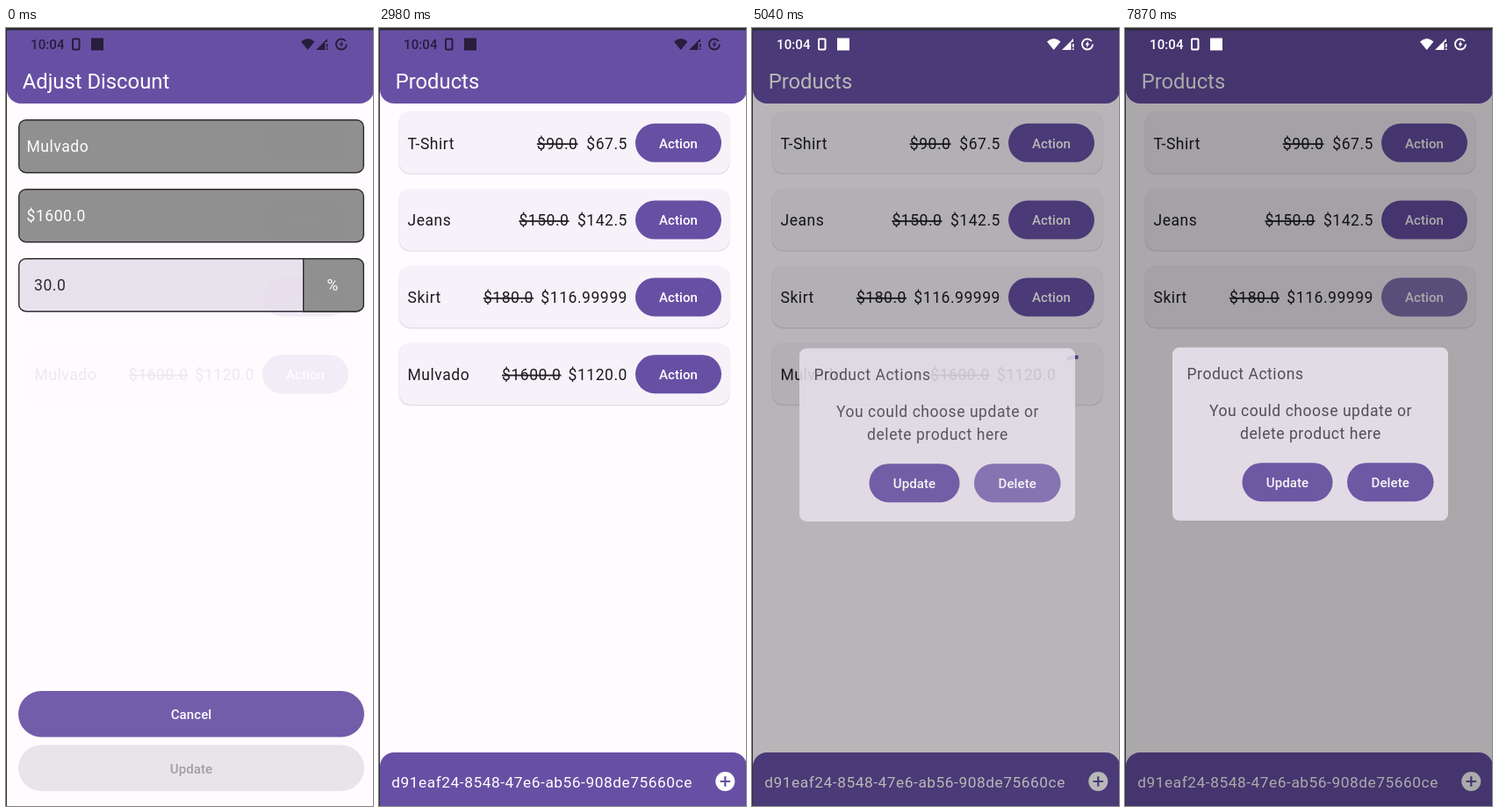
An HTML page for the animation above (8 s loop, 418 by 886 pixels).

```html
<!DOCTYPE html>
<html lang="en">
<head>
<meta charset="utf-8">
<style>
  html, body { margin: 0; width: 100%; height: 100%; overflow: hidden; background: #fffbfe; }
  svg { display: block; width: 100vw; height: 100vh; font: 17.5px Roboto, sans-serif; letter-spacing: .55px; }
  .label { font-size: 15px; font-weight: 500; letter-spacing: .1px; text-anchor: middle; }
  .title { font-size: 23.8px; letter-spacing: 0; }
  .end { text-anchor: end; }
  .mid { text-anchor: middle; }
  .old { text-decoration: line-through; }
  .spin { fill: none; stroke: #6750a4; stroke-width: 4.4; }
</style>
</head>
<body>
<svg id="stage" viewBox="0 0 418 886"></svg>
<script>
const LOOP = 8000, STEP = 148.25;
const PURPLE = '#6750a4', INK = '#1c1b1f', ITEM = 'Mulvado';

const rect = (x, y, w, h, r, fill, more = '') =>
  `<rect x="${x}" y="${y}" width="${w}" height="${h}" rx="${r}" fill="${fill}" ${more}/>`;
const text = (x, y, str, fill = INK, cls = '') =>
  `<text x="${x}" y="${y}" fill="${fill}" class="${cls}">${str}</text>`;
const button = (x, y, w, h, str, id) =>
  rect(x, y, w, h, h / 2, PURPLE) +
  (id ? rect(x, y, w, h, h / 2, '#fff', `id="${id}" opacity="0"`) : '') +
  text(x + w / 2, y + h / 2 + 5.8, str, '#fff', 'label');
const spinner = id => `<circle id="${id}" class="spin" r="19.8" pathLength="360"/>`;

function row(i, name, old, oldEnd, price) {
  const y = 95 + i * 87.8;
  return `<g id="row${i}">` +
    rect(22.5, y + .3, 377, 71.5, 13, '#e3dee6') + rect(23, y, 376, 70.5, 13, '#f7f2fa') +
    text(32.5, y + 42.5, name) +
    `<g id="price${i}">` + text(oldEnd, y + 42.5, old, INK, 'end old') +
    text(283, y + 42.5, price, INK, 'end') + '</g>' +
    `<g id="action${i}">` + button(292, y + 13.8, 98, 44, 'Action', 'ripple' + i) + '</g></g>';
}

function field(y, fill, str, x, color) {
  return rect(14.7, y, 392.6, 60, 8, fill, `stroke="${INK}" stroke-width="1.4"`) +
    text(x, y + 36.5, str, color);
}

const list = row(0, 'T-Shirt', '$90.0', 226.5, '$67.5') +
  row(1, 'Jeans', '$150.0', 216.5, '$142.5') +
  row(2, 'Skirt', '$180.0', 176, '$116.99999') +
  row(3, ITEM, '$1600.0', 207.5, '$1120.0') + spinner('rowSpin');

const form = field(104.7, '#888', ITEM, 23.5, '#fff') +
  field(183.7, '#888', '$1600.0', 23.5, '#fff') +
  field(262.7, '#e7e0ec', '30.0', 32, INK) +
  `<path d="M338.7 262.7H399.3a8 8 0 0 1 8 8V314.7a8 8 0 0 1-8 8H338.7z" fill="#888" stroke="${INK}" stroke-width="1.4"/>` +
  text(372.3, 299, '%', '#fff', 'mid') +
  button(14, 755, 394, 52.5, 'Cancel', 'cancelRipple') +
  rect(14, 816.5, 394, 52.5, 26.2, INK, 'opacity=".1"') +
  `<g opacity=".38">${text(211, 849, 'Update', INK, 'label')}</g>`;

const status = '<text x="28" y="24" class="label" style="text-anchor:start">10:04</text>' +
  rect(76, 12.5, 7.5, 12, 1, 'none', 'stroke="currentColor" stroke-width="2"') +
  rect(97, 11.5, 14, 14, 0, 'currentColor') +
  '<path d="M336 15.5Q343.7 8.5 351.500 15.500L343.700 25z"/>' +
  '<path d="M353 25L366 12V16H363.500V25zM365 18h1.600v4h-1.600zM365 23.300h1.600v1.700h-1.600z"/>' +
  '<circle cx="382" cy="18.500" r="6" fill="none" stroke="currentColor" stroke-width="1.900" stroke-dasharray="33 4.700"/>' +
  '<path d="M383 14.500L379.500 19.300H381.500L381 22.500L384.500 17.700H382.500z"/>';

const dialog = rect(54, 361.5, 314, 197.3, 8, '#e7e1ec') +
  text(70.5, 398, 'Product Actions', '#49454f') +
  text(211.5, 439.5, 'You could choose update or', '#49454f', 'mid') +
  text(211.5, 465.8, 'delete product here', '#49454f', 'mid') +
  button(133.5, 493, 103, 44, 'Update') + button(253, 493, 98.5, 44, 'Delete', 'deleteRipple');

const stage = document.getElementById('stage');
stage.innerHTML = rect(0, 0, 418, 886, 0, '#fffbfe') +
  `<g id="list">${list}</g>${spinner('pageSpin')}<g id="form">${form}</g>` +
  `<path d="M1 0H419V70a16 16 0 0 1-16 16H17a16 16 0 0 1-16-16z" fill="${PURPLE}"/>` +
  '<text id="title" class="title" x="18.700" y="69" fill="#fff"></text>' +
  `<g id="bar"><path d="M1 886V841a16 16 0 0 1 16-16H403a16 16 0 0 1 16 16V886z" fill="${PURPLE}"/>` +
  '<text x="14.300" y="864.500" fill="#fff" style="font-size:17.300px">d91eaf24-8548-47e6-ab56-908de75660ce</text>' +
  `<circle cx="394.300" cy="858" r="11" fill="#fff"/><path d="M388.500 858h11.600M394.300 852.200v11.600" stroke="${PURPLE}" stroke-width="2.200"/></g>` +
  rect(1, 0, 417, 886, 0, '#000', 'id="dim"') +
  `<g id="status" fill="currentColor">${status}</g><g id="dialog">${dialog}</g>` +
  rect(0, 0, 418, 2.5, 0, '#2d2c30') + rect(0, 0, 1, 886, 0, '#343237');

const el = {};
stage.querySelectorAll('[id]').forEach(e => el[e.id] = e);
const show = (id, on) => el[id].setAttribute('display', on ? 'inline' : 'none');
const fade = (id, a) => el[id].setAttribute('opacity', a);
const clamp = v => Math.min(1, Math.max(0, v));

// Standard material easing: cubic-bezier(.4, 0, .2, 1)
function ease(x) {
  let lo = 0, hi = 1, u;
  for (let i = 0; i < 16; i++) {
    u = (lo + hi) / 2;
    const v = 1 - u;
    if (1.2 * v * v * u + .6 * v * u * u + u * u * u < x) lo = u; else hi = u;
  }
  return u * u * (3 - 2 * u);
}

function spin(id, cx, cy, angle, time, phase) {
  const sweep = 150 - 130 * Math.cos((time + phase) / 1332 * 2 * Math.PI);
  el[id].setAttribute('stroke-dasharray', `${sweep} 360`);
  el[id].setAttribute('transform', `translate(${cx} ${cy}) rotate(${angle + time * .5})`);
}

function draw(ms) {
  const k = Math.floor((ms + 4) / STEP), t = k * STEP; // the screen refreshes in steps
  const products = k >= 8, loaded = k >= 12, deleting = k >= 34;

  const formIn = ease(clamp((t + 470) / 700));
  const formOut = products ? ease(clamp((t - 917) / 700)) : 0;
  fade('form', formIn * (1 - formOut));
  fade('list', products ? 1 : 1 - formIn);
  show('list', !products || loaded);
  show('bar', products);
  el.title.textContent = products ? 'Products' : 'Adjust Discount';
  fade('cancelRipple', k >= 6 && k < 12 ? .15 : 0);

  show('pageSpin', products && !loaded);
  fade('pageSpin', formOut);
  spin('pageSpin', 210.5, 461, -67, t - 1186, 128);

  show('row3', k < 40);
  show('action3', !deleting);
  el.price3.setAttribute('transform', `translate(${deleting ? 63.3 : 0} 0)`);
  show('rowSpin', deleting && k < 40);
  spin('rowSpin', 368.3, 394.7, -43, t - 5189, 256);
  fade('ripple3', k >= 28 && k < 32 ? .2 : 0);
  fade('ripple2', k >= 52 ? .2 : 0);
  fade('deleteRipple', k === 34 ? .15 : 0);

  const open = t < 4960 ? clamp((t - 4190) / 165)
    : t < 7000 ? clamp(1 - (t - 4960) / 150)
    : clamp((t - 7766) / 165);
  const rest = (1 - open) ** 2;
  fade('dim', .6 * open);
  show('dialog', open > 0);
  fade('dialog', 1 - rest * .5);
  el.dialog.setAttribute('transform', `translate(0 ${rest * 11})`);
  el.status.setAttribute('color', open > 0 ? '#fff' : '#271d3d');
}

function tick() {
  draw(performance.now() % LOOP);
  requestAnimationFrame(tick);
}
tick();
</script>
</body>
</html>
```
